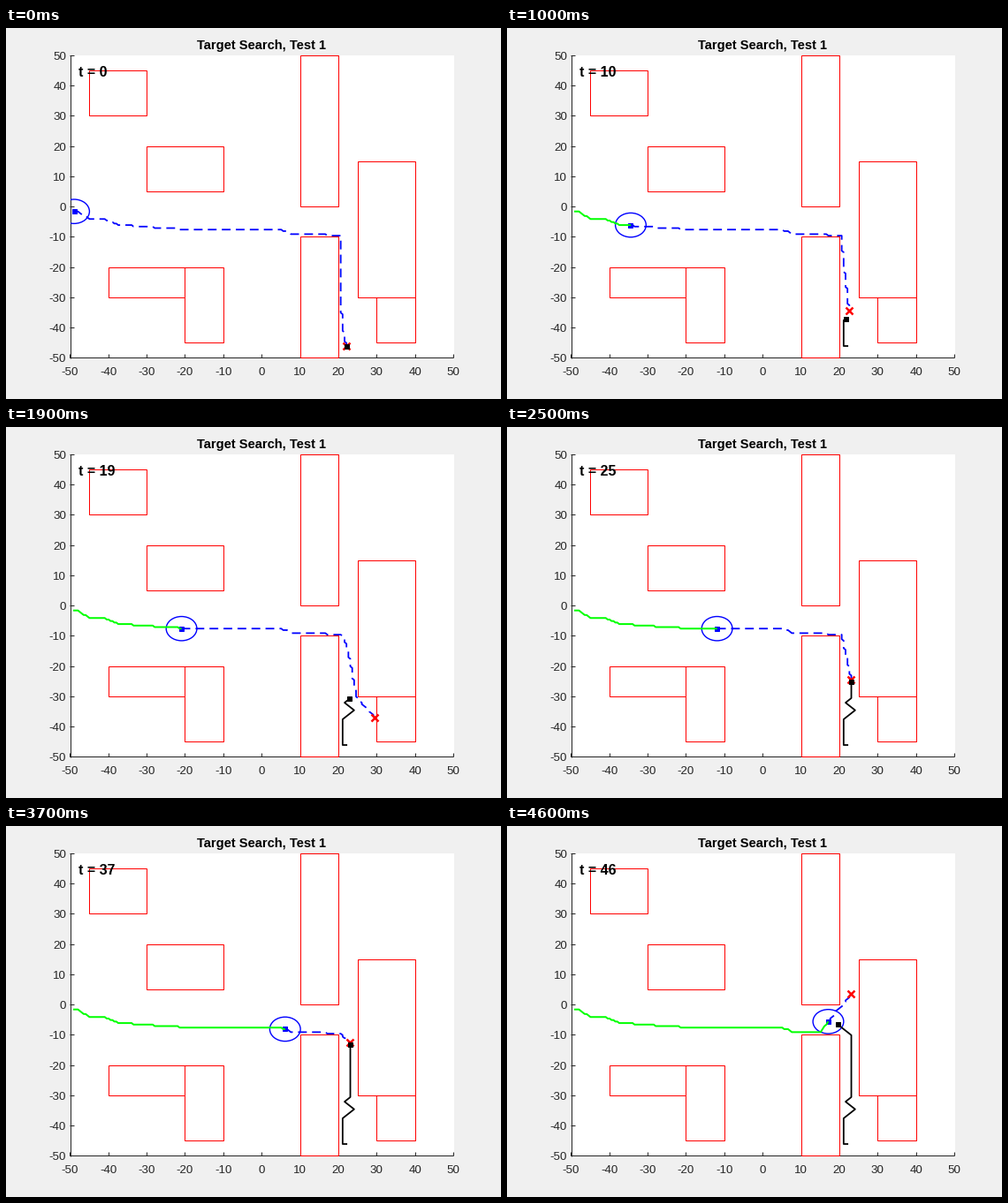
These frames come from a looping animation (560x420 px, 7600 ms). A matplotlib script:

```python
import numpy as np
import matplotlib.pyplot as plt
from matplotlib.animation import FuncAnimation
from matplotlib.patches import Ellipse, Rectangle
from matplotlib.transforms import Affine2D

W, H, DPI = 560, 420, 80
LEFT, TOP, WIDE, HIGH = 72.7, 31.4, 434, 342.3   # plot area in pixels
LAST, FRAMES, STEP_MS = 46, 76, 100
GREY, RED, BLUE = "#262626", "#ff0000", "#0000ff"
plt.rcParams["font.family"] = "Liberation Sans"


def px(n):
    """Pixels to points."""
    return n * 72 / DPI


def grid(p):
    """Round to the half-unit search grid."""
    return np.round(np.asarray(p) * 2) / 2


def stairs(keys):
    """Grid path through key points ordered by x."""
    x, y = np.transpose(keys)
    xs = np.arange(x[0], x[-1] + 0.5, 0.5)
    return np.column_stack([xs, grid(np.interp(xs, x, y))])


def leg(a, b, bend=1):
    """Grid path from a to b; a bend above 1 turns sideways late."""
    u = np.linspace(0, 1, 2 * int(np.abs(np.subtract(b, a)).max()) + 2)
    return grid(np.column_stack([a[0] + (b[0] - a[0]) * u ** bend,
                                 a[1] + (b[1] - a[1]) * u]))


def track(keys, t):
    """Position at time t along rows of (time, x, y)."""
    time, x, y = np.transpose(keys)
    return np.array([np.interp(t, time, x), np.interp(t, time, y)])


SHARED = [(-49, -1.5), (-48, -1.5), (-45, -4), (-41.5, -4), (-37, -6),
          (-19, -7.5), (5, -7.5), (8, -9), (15, -9)]
GAP, CORNER, WALL = (17, -5.5), (20.5, -9.5), (24.5, -30)
ROUTE = stairs(SHARED + [GAP])
PLAN = stairs(SHARED + [(18, -9.5), CORNER])
WALK = [(0, 22, -46), (1, 21, -46), (9.5, 21, -37.5), (12.5, 24, -34.5),
        (15, 21.5, -32), (19.5, 23, -30.5), (37, 23, -13), (42.5, 23, -10),
        (46, 19.5, -6.5)]
GOAL = [(0, 22, -46), (3, 25.5, -47.5), (10, 22.5, -34.5), (19, 29.5, -37),
        (25, 23, -24.5), (30, 22, -16), (37, 23, -12.5), (40, 23, -12.5),
        (46, 23, 3.5)]


def seeker(t):
    x = grid(np.interp(t, (0, 10, 43, 46), (-49, -34.5, 15, 17)))
    return np.array([x, np.interp(x, *ROUTE.T)])


def plan(pos, goal, t):
    if goal[1] > CORNER[1]:
        way, tail = ROUTE, leg(GAP, goal)
    elif goal[0] > WALL[0] and goal[1] < WALL[1]:
        way = PLAN
        tail = np.vstack([leg(CORNER, WALL, 0.6), leg(WALL, goal)])
    else:
        way, tail = PLAN, leg(CORNER, goal, 1 + 4 * np.exp(-t / 4))
    return np.vstack([pos, way[way[:, 0] > pos[0]], tail])


fig = plt.figure(figsize=(W / DPI, H / DPI), dpi=DPI, facecolor="#f0f0f0")
ax = fig.add_axes([LEFT / W, 1 - (TOP + HIGH) / H, WIDE / W, HIGH / H])
ax.set(xlim=(-50, 50), ylim=(-50, 50), xticks=[], yticks=[])
for spine in ax.spines.values():
    spine.set_visible(False)

# half a pixel up and left, so that snapped shapes cover the pixel they fall in
snap = ax.transData + Affine2D().translate(-0.5, 0.5)


def label(x, y, s, size=13.33, **kw):
    return fig.text(x / W, 1 - y / H, s, fontsize=px(size), va="baseline", **kw)


def rule(xs, ys, transform=snap):
    ax.plot(xs, ys, color=GREY, lw=px(1), zorder=1, clip_on=False,
            solid_capstyle="butt", transform=transform)


def line(color, width, z, **kw):
    return ax.plot([], [], color=color, lw=px(width), zorder=z, **kw)[0]


def marker(color, shape, size, edge, z):
    return line(color, 0, z, marker=shape, ms=px(size), mew=px(edge),
                transform=snap)


rule((-50, 50), (-50, -50))
rule((-50, -50), (-50, 50), ax.transData)
for v in range(-50, 51, 10):
    rule((v, v), (-50, -48.75))
    rule((-50, -49), (v, v))
    label(LEFT + WIDE * (v + 50) / 100 - 0.5, 393, str(v), ha="center", color=GREY)
    label(68, TOP + HIGH * (50 - v) / 100 + 4.6, str(v), ha="right", color=GREY)

label(289.4, 24, "Target Search, Test 1", 14.67, weight="bold", ha="center")
clock = label(81.5, 55, "t = 0", 16, weight="bold", ha="left")

for x, y, w, h in [(-45, 30, 15, 15), (-30, 5, 20, 15), (10, 0, 10, 50),
                   (25, -30, 15, 45), (10, -50, 10, 40), (-40, -30, 20, 10),
                   (-20, -45, 10, 25), (30, -45, 10, 15)]:
    box = Rectangle((x, y), w, h, fill=False, ec=RED, lw=px(1), zorder=2,
                    transform=snap)
    ax.add_patch(box)
    box.set_clip_on(False)

ring = ax.add_patch(Ellipse((0, 0), 8, 8, fill=False, ec=BLUE, lw=px(1.4),
                            zorder=3))
seek_dot = marker(BLUE, "s", 5, 1, 4)
seek_trail = line("#00ff00", 2, 5)
plan_line = line(BLUE, 1.8, 6, dashes=(5.5, 3.3), dash_capstyle="butt")
cross = marker(RED, "x", 7.5, 2.5, 7)
walk_trail = line("#000000", 1.8, 8)
walk_dot = marker("#000000", "s", 5, 1, 9)


def draw(i):
    t = min(i, LAST)
    pos, walker, goal = seeker(t), track(WALK, t), grid(track(GOAL, t))
    clock.set_text(f"t = {t}")
    ring.set_center(pos)
    for dot, (x, y) in ((seek_dot, pos), (walk_dot, walker), (cross, goal)):
        dot.set_data([x], [y])
    plan_line.set_data(*plan(pos, goal, t).T)
    seek_trail.set_data(*ROUTE[ROUTE[:, 0] <= pos[0]].T)
    past = [(x, y) for time, x, y in WALK if time < t]
    walk_trail.set_data(*np.transpose(past + [tuple(walker)]))
    return clock, ring, seek_dot, seek_trail, plan_line, cross, walk_trail, walk_dot


anim = FuncAnimation(fig, draw, frames=FRAMES, interval=STEP_MS,
                     init_func=lambda: draw(0), repeat=True, repeat_delay=0)
plt.show()
```
